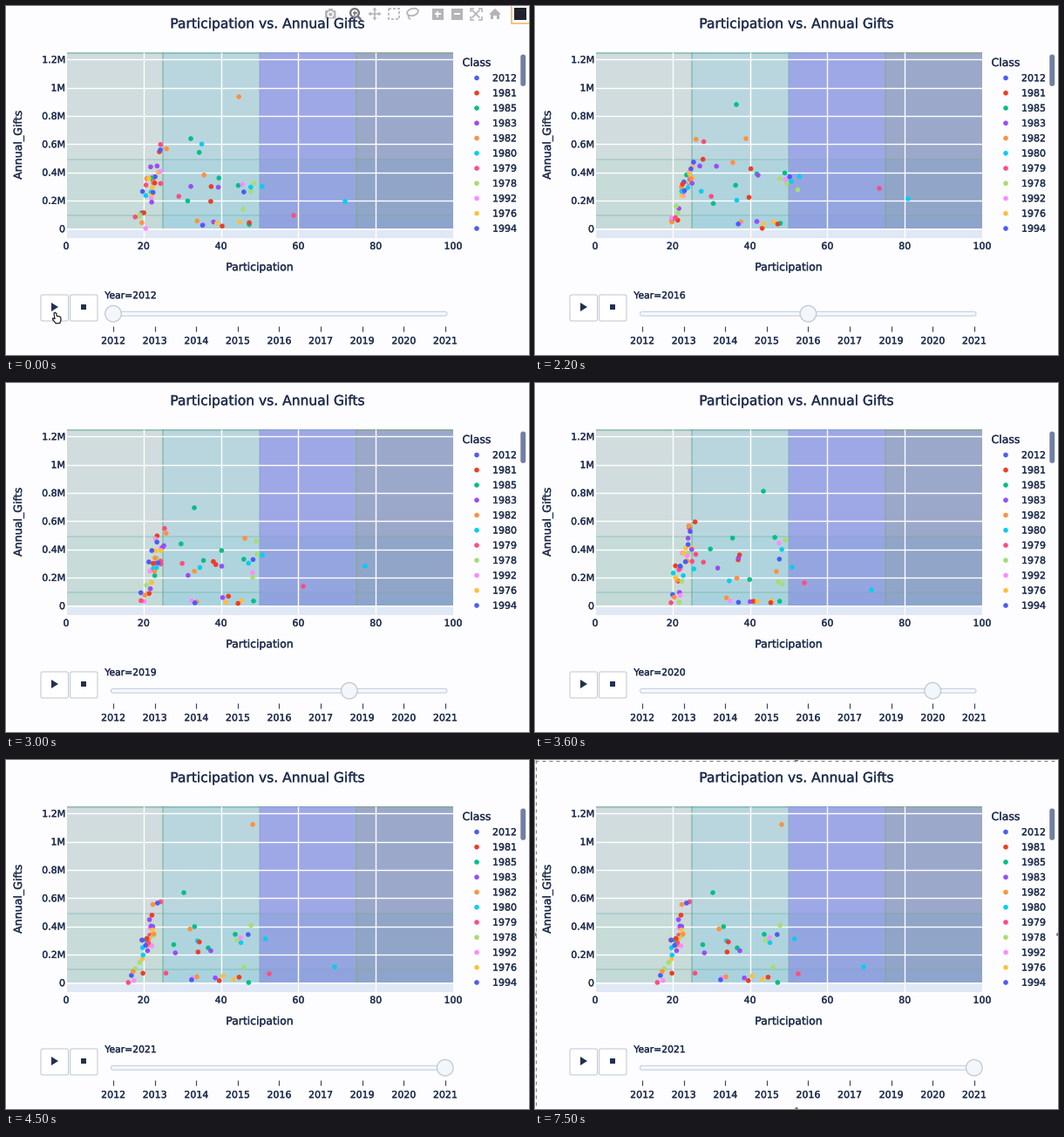
Animation of 600x400 px, one loop 7600 ms. Source, as a matplotlib script:

```python
import matplotlib.pyplot as plt
import numpy as np
from matplotlib.animation import FuncAnimation
from matplotlib.patches import Circle, Ellipse, FancyBboxPatch, Polygon, Rectangle
from matplotlib.patheffects import Normal, Stroke

W, H, PT = 600, 400, 0.72
FRAMES, STEP = 76, 100
INK, PAPER, ICON = "#22304f", "#fdfdff", "#b4b4b8"
COLORS = ["#4b5cfa", "#ee3d24", "#00bf86", "#9a4bfa", "#ff9140",
          "#08cdf0", "#ff4d7f", "#a8dd70", "#ff8bff", "#ffc03c"]
CLASSES = [2012, 1981, 1985, 1983, 1982, 1980, 1979, 1978, 1992, 1976, 1994]
YEARS = [2012, 2013, 2014, 2015, 2016, 2017, 2019, 2020, 2021]
KEY_TIMES = [0, 1600, 2200, 3000, 3600, 4400]
YEAR_SHIFT = [0, 12, 9, 3, 2, -5]
START = 1600

# The classes that stand apart from the crowd: colour index and path.
LEADERS = {
    5: [(389, 224), (438, 214), (428, 221), (412, 210), (386, 237), (377, 237)],
    6: [(330, 240), (410, 221), (395, 209), (341, 233), (309, 229), (302, 245)],
    2: [(212, 152), (250, 116), (231, 113), (216, 143), (262, 124), (204, 152)],
    4: [(267, 104), (257, 168), (242, 152), (274, 178), (277, 216), (283, 74)],
}


def make_crowd(count=62, seed=7):
    """Stage positions for each year: a steep column, a wide middle and a low fringe."""
    rng = np.random.default_rng(seed)
    group = rng.permutation(np.arange(count) % 20)
    rise, spread = rng.random((2, count))
    column, middle = group < 11, group < 17
    x = np.where(column, 155 + 26 * rise, np.where(middle, 198 + 98 * spread ** 1.3, 182 + 95 * spread))
    y = np.where(column, 251 - 92 * rise, np.where(middle, 207, 250))
    sway = np.where(column, 6, np.where(middle, 15, 2.5))
    states = [np.column_stack([x + shift + rng.normal(0, 5, count),
                               np.clip(y + rng.normal(0, 1, count) * sway, 125, 255)])
              for shift in YEAR_SHIFT]
    return np.array(states)


crowd = make_crowd()
POINTS = np.concatenate([crowd, np.swapaxes(list(LEADERS.values()), 0, 1)], axis=1)
POINT_COLORS = [COLORS[k % 10] for k in range(crowd.shape[1])] + [COLORS[k] for k in LEADERS]

fig = plt.figure(figsize=(W / 100, H / 100), dpi=100, facecolor=PAPER)
ax = fig.add_axes([0, 0, 1, 1])
ax.set(xlim=(0, W), ylim=(H, 0))
ax.axis("off")


def add(patch):
    return ax.add_patch(patch)


def box(x0, y0, x1, y1, fill, edge="none", lw=0, z=1, **kw):
    return add(Rectangle((x0, y0), x1 - x0, y1 - y0, fc=fill, ec=edge, lw=lw * PT, zorder=z, **kw))


def pill(x0, y0, x1, y1, r, fill, edge="none", lw=1, z=3):
    return add(FancyBboxPatch((x0, y0), x1 - x0, y1 - y0, fc=fill, ec=edge, lw=lw * PT, zorder=z,
                              boxstyle=f"round,pad=0,rounding_size={r}"))


def line(xs, ys, color, lw=1, z=2, **kw):
    return ax.plot(xs, ys, color=color, lw=lw * PT, zorder=z, solid_capstyle="butt", **kw)[0]


def label(x, y, text, size=11, ha="center", va="baseline", rotation=0):
    if va == "baseline":
        y += 0.34 * size
    return ax.text(x, y, text, fontsize=size * PT, ha=ha, va=va, rotation=rotation, color=INK,
                   family="DejaVu Sans", zorder=6,
                   path_effects=[Stroke(linewidth=0.25, foreground=INK), Normal()])


def px(v):
    return 69 + 4.44 * v


def py(millions):
    return 255.5 - 161.7 * millions


def knob_x(index):
    return 123 + 47.6 * index


def draw_plot():
    box(69, 53, 513, 266, "#e0e8f5")
    columns = [("#d0dcde", "#c7dbd9", "#c4dad8"), ("#b9d6de", "#afd4dd", "#a9d2df"),
               ("#9ea8e6", "#95a5e0", "#90a3de"), ("#9ba8c9", "#91a5c9", "#8da4cb")]
    edges = ["#5fa88f", "#5fa88f", "#7fa5c0", "#83a878"]
    levels = [53, 175, 239, 255.5]
    for i, (shades, edge) in enumerate(zip(columns, edges)):
        left, right = px(25 * i), px(25 * i + 25)
        for top, bottom, shade in zip(levels, levels[1:], shades):
            box(left, top, right, bottom, shade)
        for y, alpha in zip(levels, (0.45, 0.22, 0.25)):
            line([left, right], [y + 0.5, y + 0.5], edge, 2, alpha=alpha)
        if i:
            line([left, left], [53, 255.5], edge, 2, alpha=0.45)
    for v in range(0, 101, 20):
        if 0 < v < 100:
            line([px(v)] * 2, [53, 266], "white", 1.4, 2.5)
        label(px(v), 275, str(v))
    for k in range(7):
        y = py(k * 0.2)
        line([69, 513], [y, y], "white", 1.4 if k else 2, 2.5)
        label(68, y, f"{k * 0.2:.1f}".replace(".0", "") + "M" if k else "0", ha="right")
    line([69, 69], [53, 266], "white", 2, 2.5)
    label(300, 20, "Participation vs. Annual Gifts", 15.5)
    label(291, 299, "Participation", 12.4)
    label(14.5, 159, "Annual_Gifts", 12.6, va="center", rotation=90)


def draw_legend():
    label(523.5, 64.7, "Class", 12.5, "left")
    for k, year in enumerate(CLASSES):
        y = 82.5 + 17.25 * k
        add(Circle((540, y), 2.8, fc=COLORS[k % 10], lw=0, zorder=4))
        label(558, y, str(year), ha="left")
    pill(590.3, 55.6, 596.2, 91.8, 2.6, "#7080a2", lw=0)


def draw_controls():
    for x in (40, 73.5):
        pill(x, 331, x + 31.5, 361, 2, "white", "#bdc6d4")
    add(Polygon([(52, 340), (52, 350), (60, 345)], fc=INK, zorder=4))
    box(86.3, 342, 92.3, 348, INK, z=4)
    pill(120.5, 350.3, 506, 355.2, 2.4, "#f4f7fd", "#c0cadb")
    for k, year in enumerate(YEARS):
        x = knob_x(k)
        line([x, x], [366.5, 373], "#3c4660", 1.2)
        label(x, 383.5, str(year))


def draw_toolbar():
    """Mode bar with its icons, plus the pointing hand over the play button."""
    parts = [pill(366, 5, 378.5, 14.5, 1.5, ICON, lw=0), box(369.5, 3, 375, 6, ICON, z=3),
             add(Circle((372.3, 9.6), 3, fc=ICON, ec="white", lw=1.2, zorder=4))]
    dark = "#77777b"
    parts += [add(Circle((400, 8), 4.9, fc="none", ec=dark, lw=1.6, zorder=4)),
              line([403.4, 407.5], [11.6, 16], dark, 2.6, 4),
              line([397.5, 402.5], [8, 8], dark, 1.6, 4), line([400, 400], [5.5, 10.5], dark, 1.6, 4)]
    parts += [line([417, 429], [9, 9], ICON, 1.6, 4), line([423, 423], [3, 15], ICON, 1.6, 4)]
    for dx, dy in ((1, 0), (-1, 0), (0, 1), (0, -1)):
        tip = np.array([423 + 7.5 * dx, 9 + 7.5 * dy])
        back, side = np.array([dx, dy]) * 3.2, np.array([dy, dx]) * 2.6
        parts.append(add(Polygon([tip, tip - back + side, tip - back - side], fc=ICON, zorder=4)))
    parts += [box(438.5, 3, 451, 15, "none", ICON, 1.8, 4, ls=(0, (1.6, 1.2))),
              add(Ellipse((466.5, 7), 13, 8, angle=-15, fc="none", ec=ICON, lw=1.3, zorder=4)),
              line([462, 461.5, 464], [10, 13, 15.5], ICON, 1.6, 4)]
    for x in (495, 517):
        parts += [box(x - 6.5, 3, x + 6.5, 15.5, ICON, z=3),
                  line([x - 3.5, x + 3.5], [9.2, 9.2], "white", 2, 4)]
    parts.append(line([495, 495], [5.7, 12.7], "white", 2, 4))
    for sx in (-1, 1):
        parts.append(line([534.5, 543.5], [9 - 4.5 * sx, 9 + 4.5 * sx], ICON, 1.7, 4))
        for sy in (-1, 1):
            cx, cy = 539 + 6.5 * sx, 9 + 6.5 * sy
            parts.append(line([cx - 4 * sx, cx, cx], [cy, cy, cy - 4 * sy], ICON, 1.6, 4))
    parts += [add(Polygon([(554, 9.5), (561, 3), (568, 9.5)], fc=ICON, zorder=4)),
              box(556, 9, 566, 15, ICON, z=4), box(559.3, 11, 562.7, 15, PAPER, z=5),
              box(579.5, -1, 601, 20, "white", "#f2b25c", 1.5, 3),
              box(583, 2, 597, 16, "#20222e", z=4)]
    hand = [(55, 352), (56.5, 351.3), (57.8, 352.5), (58.4, 355.5), (61, 355.7), (62.7, 356.8), (63, 360),
            (61.8, 363.5), (57.3, 363.8), (54, 360), (53.3, 358.2), (54.7, 357.8), (56, 358.8)]
    parts.append(add(Polygon(hand, fc="white", ec="#222222", lw=0.9, zorder=8)))
    return parts


def draw_border():
    """Dashed selection frame with a small handle in the middle of each side."""
    style = dict(color="#7d7d80", lw=1, z=9, ls=(0, (4, 4)))
    parts = [line([0, W], [y, y], **style) for y in (0.5, H - 0.5)]
    parts += [line([x, x], [0, H], **style) for x in (0.5, W - 0.5)]
    for center in ((W / 2, 0), (W / 2, H), (0, H / 2), (W, H / 2)):
        parts.append(add(Circle(center, 2, fc="#7d7d80", lw=0, zorder=9)))
    return parts


draw_plot()
draw_legend()
draw_controls()
toolbar = draw_toolbar()
border = draw_border()
dots = ax.scatter(*POINTS[0].T, s=(5.6 * PT) ** 2, c=POINT_COLORS, lw=0, zorder=4)
knob = add(Circle((knob_x(0), 352.7), 9.3, fc="#f3f6fa", ec="#bfc8d4", lw=0.9, zorder=5))
year_text = label(113.3, 331.5, "Year=2012", 10.8, "left")


def ease(u):
    u = min(max(u, 0), 1)
    return 4 * u ** 3 if u < 0.5 else 1 - 4 * (1 - u) ** 3


def positions(t):
    if t < START:
        return POINTS[0]
    place = np.interp(t, KEY_TIMES, range(len(KEY_TIMES)))
    k = min(int(place), len(KEY_TIMES) - 2)
    return POINTS[k] + (POINTS[k + 1] - POINTS[k]) * (place - k)


def update(i):
    t = i * STEP
    started = t >= START
    # A new year begins every half second; the knob takes 150 ms to get there.
    index = min(3 + int((t - 1414) // 500), 8) if started else 0
    begin = 1414 + 500 * (index - 3)
    x = knob_x(index - 1 + ease((t - begin) / 150)) if started else knob_x(0)
    knob.center = (x, 352.7)
    year_text.set_text(f"Year={YEARS[index]}")
    dots.set_offsets(positions(t))
    for part in toolbar:
        part.set_visible(not started)
    for part in border:
        part.set_visible(t >= 5200)
    return [dots, knob, year_text, *toolbar, *border]


anim = FuncAnimation(fig, update, frames=FRAMES, interval=STEP, repeat=True, repeat_delay=0, blit=False)
plt.show()
```
